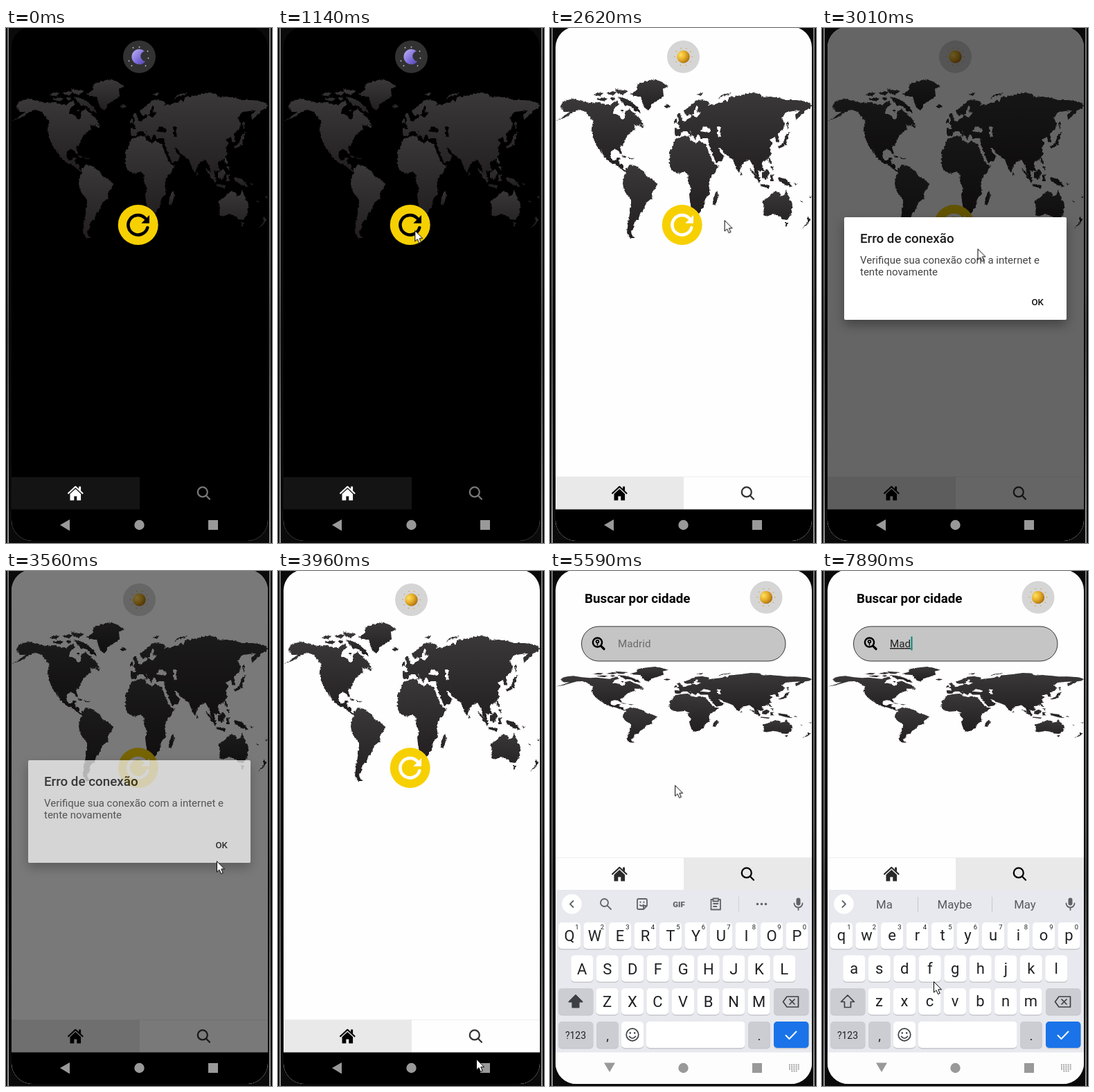
An HTML page for the animation above (8000 ms loop, 384 by 743 pixels).

```html
<!DOCTYPE html>
<html lang="pt">
<head>
<meta charset="utf-8">
<title>Weather app demo</title>
<style>
html, body { margin: 0; width: 100%; height: 100%; overflow: hidden; background: #0a0a0a; }
svg { display: block; width: 384px; height: 743px; font-family: Roboto, "Open Sans", sans-serif; }
#stage, #stage .run { animation: 8s infinite; }
#stage { animation-name: state; animation-timing-function: step-end; }

/* Themes, pages and layout change at once */
@keyframes state {
  0% {
    --bg: #000; --line: #000; --btn: #323232; --ink: #000; --moon: 1; --sun: 0;
    --tabL: #141414; --tabR: #000; --homeIcon: #fff; --findIcon: #777;
    --home: 1; --find: 0; --btnAt: translate(192.5px, 41.5px);
    --map: none; --up: 0px; --fieldY: 0px; --tabsY: 0px;
    --rim: transparent; --pin: #555; --nav: #000; --typing: 0;
    --hint: #6c6c6c; --c1: transparent; --c2: transparent; --c3: transparent;
    --lower: 0; --words: 0;
  }
  27.75% {
    --bg: #fefefe; --line: #eee; --btn: #d5d5d5; --ink: #fff; --moon: 0; --sun: 1;
    --tabL: #e9e9e9; --tabR: #fefefe; --homeIcon: #000; --findIcon: #333;
  }
  51.375% {
    --home: 0; --find: 1; --btnAt: translate(312px, 50.5px);
    --map: translateY(99.6px) scaleY(.843);
    --tabL: #fefefe; --tabR: #e9e9e9; --homeIcon: #2a2a2a; --findIcon: #000;
  }
  62.75% {
    --btnAt: translate(312px, 38px); --map: translateY(102.6px) scaleY(.478);
    --up: -12px; --fieldY: -23.5px; --tabsY: -234px;
    --rim: #333; --pin: #000; --nav: #fdfdfd; --typing: 1;
  }
  94.375% { --hint: transparent; --c1: #222; --lower: 1; }
  96.625% { --c2: #222; }
  97.375% { --words: 1; }
  98.5% { --c3: #222; }
}
@keyframes dim {
  0%, 14.375% { opacity: 0 } 16.25%, 21.125% { opacity: .6 } 23.375%, 35.75% { opacity: 0 }
  37.625%, 44.225% { opacity: .6 } 46.475%, 100% { opacity: 0 }
}
@keyframes dialog {
  0%, 14.375% { opacity: 0; transform: scale(.9) }
  16.25%, 21% { opacity: 1; transform: none }
  22.25% { opacity: 0; transform: none }
  35.75% { opacity: 0; transform: scale(.9) }
  37.625%, 44.125% { opacity: 1; transform: none }
  45.375%, 100% { opacity: 0; transform: none }
}
@keyframes slide {
  0%, 62.5% { transform: translateY(240px); animation-timing-function: ease-out }
  65.25%, 100% { transform: none }
}
@keyframes caret {
  0% { opacity: 0; transform: none } 62.75% { opacity: 1 } 65.625% { opacity: 0 }
  71.875% { opacity: 1 } 78.125% { opacity: 0 } 84.375% { opacity: 1 } 90.625% { opacity: 0 }
  94.375% { opacity: 1; transform: translateX(13px) }
  96.625% { opacity: 1; transform: translateX(21px) }
  98.5% { opacity: 1; transform: translateX(30px) }
}
@keyframes pointer {
  0%, 4.75% { transform: translate(236px, 750px) }
  8.5% { transform: translate(208px, 440px) }
  11.5% { transform: translate(194px, 298px) }
  14% { transform: translate(192px, 286px) }
  16% { transform: translate(240px, 330px) }
  19% { transform: translate(306px, 389px) }
  20.6% { transform: translate(309px, 391px) }
  21.875% { transform: translate(293px, 346px) }
  24.75% { transform: translate(214px, 100px) }
  26.5% { transform: translate(195px, 46px) }
  28% { transform: translate(195px, 44px) }
  30% { transform: translate(222px, 130px) }
  32.75% { transform: translate(253px, 277px) }
  34.5% { transform: translate(200px, 287px) }
  36% { transform: translate(196px, 288px) }
  38% { transform: translate(232px, 325px) }
  41.6% { transform: translate(309px, 391px) }
  43.5% { transform: translate(310px, 393px) }
  44.5% { transform: translate(305px, 417px) }
  47.5%, 49.5% { transform: translate(287px, 704px) }
  51%, 51.8% { transform: translate(285px, 677px) }
  56.375% { transform: translate(230px, 255px) }
  59.25%, 61.5% { transform: translate(172px, 130px) }
  69.875% { transform: translate(181px, 308px) }
  71.5% { transform: translate(199px, 400px) }
  76% { transform: translate(62px, 545px) }
  78% { transform: translate(39px, 575px) }
  80.2% { transform: translate(72px, 590px) }
  85.6%, 100% { transform: translate(162px, 592px) }
}

#dim { animation-name: dim !important; }
#dialog { animation-name: dialog !important; transform-origin: 192.5px 347px; }
#keyboard { animation-name: slide !important; }
#caret { animation-name: caret !important; animation-timing-function: step-end !important; }
#pointer, #dim, #dialog { animation-timing-function: linear !important; }
#pointer { animation-name: pointer !important; }

#map { transform: var(--map); }
#round { transform: var(--btnAt); }
#title { transform: translateY(var(--up)); }
#field { transform: translateY(var(--fieldY)); }
#tabs { transform: translateY(var(--tabsY)); }
.home { opacity: var(--home); }
.find { opacity: var(--find); }
.typing { opacity: var(--typing); }
.resting { opacity: calc(1 - var(--typing)); }
.low { opacity: var(--lower); }
.up { opacity: calc(1 - var(--lower)); }
.words { opacity: var(--words); }
.tools { opacity: calc(1 - var(--words)); }
.line { fill: none; stroke-linecap: round; stroke-linejoin: round; }
.typed tspan { text-decoration: underline; }
#keyboard text { text-anchor: middle; fill: #202124; }
</style>
</head>
<body>
<svg id="stage" viewBox="0 0 384 743">
  <defs>
    <clipPath id="screen"><rect x="8" y="-2" width="370" height="742" rx="30"/></clipPath>
    <linearGradient id="edge" x2="0" y2="1">
      <stop stop-color="#7c7c7c"/><stop offset=".5" stop-color="#606060"/>
      <stop offset=".6" stop-color="#505050"/><stop offset="1" stop-color="#999"/>
    </linearGradient>
    <linearGradient id="land" x2="0" y2="1">
      <stop stop-color="#3a3839"/><stop offset="1" stop-color="#231f20"/>
    </linearGradient>
    <linearGradient id="wide" href="#land" gradientUnits="userSpaceOnUse" x1="0" y1="92" x2="0" y2="220"/>
    <radialGradient id="gold" cx=".3" cy=".35" r=".75">
      <stop stop-color="#ffe060"/><stop offset=".5" stop-color="#e6ae28"/><stop offset="1" stop-color="#a86c10"/>
    </radialGradient>
    <linearGradient id="violet" x2="1" y2="1">
      <stop stop-color="#c3b6f5"/><stop offset=".6" stop-color="#7a6bd8"/><stop offset="1" stop-color="#4f42a8"/>
    </linearGradient>
    <filter id="coast" color-interpolation-filters="sRGB">
      <feTurbulence type="fractalNoise" baseFrequency=".28" numOctaves="2" seed="4"/>
      <feDisplacementMap in="SourceGraphic" scale="4" xChannelSelector="R" yChannelSelector="G"/>
    </filter>
    <filter id="shade" x="-15%" y="-25%" width="130%" height="160%">
      <feDropShadow dx="0" dy="7" stdDeviation="8" flood-opacity=".35"/>
    </filter>
  </defs>

  <rect width="384" height="743" fill="#0a0a0a"/>
  <rect x="2" width="2" height="743" fill="url(#edge)"/>
  <rect x="380" width="2" height="743" fill="url(#edge)"/>

  <g clip-path="url(#screen)">
    <rect x="8" y="-2" width="370" height="742" fill="var(--bg)"/>

    <g id="map"><g fill="url(#land)" fill-rule="evenodd" filter="url(#coast)">
      <path d="M17 117L15 111 22 105 33 102 46 106 58 108 67 107 76 109 86 111 92 107 97 104 100 110 93 115 91 122 99 126 104 132 108 129 108 121 115 117 121 123 129 129 134 139 127 141 121 140 124 146 116 151 110 158 107 166 101 172 104 181 102 182 98 176 93 175 88 178 87 185 90 191 95 191 97 187 101 187 99 195 106 197 106 204 112 207 107 207 98 199 86 193 78 186 72 172 76 183 68 171 62 158 60 146 62 135 55 124 46 118 38 119 30 124 20 130 8 134 19 128 28 121 20 121Z"/>
      <path d="M116 95L127 89 125 82 138 77 152 74 162 78 171 84 163 88 164 98 155 105 147 110 143 119 137 116 133 107 131 99 122 98Z"/>
      <path d="M62 97L70 93 77 94 73 98ZM67 103L76 100 83 102 79 106ZM81 95L91 91 97 93 91 97ZM87 101L92 99 94 103 89 105ZM98 99L109 102 118 107 127 115 131 122 123 120 117 113 108 111 102 105ZM94 88L113 91 105 96 98 95ZM102 118L107 118 105 122ZM164 112L169 110 174 112 170 116 166 115Z"/>
      <path d="M101 182L111 186 106 186ZM113 187L122 188 117 190ZM130 140L136 140 133 145Z"/>
      <path d="M109 203L116 197 124 199 131 204 137 208 139 214 147 218 154 224 153 231 148 236 147 246 139 252 135 262 130 268 128 275 122 279 121 286 117 293 118 299 122 303 116 303 111 295 113 280 116 262 117 248 109 238 105 226 106 215 110 210Z"/>
      <path d="M181 160L188 157 200 155 203 162 211 166 216 163 225 167 229 179 234 190 238 197 243 198 240 207 231 217 229 225 231 238 224 247 223 256 216 267 209 270 205 266 202 250 201 240 204 232 199 221 200 212 195 208 184 210 176 206 172 197 173 180 178 168Z"/>
      <path d="M241 234L243 241 239 256 235 254 236 243Z"/>
      <g fill="url(#wide)">
        <path d="M180 152L180 145 188 146 186 139 193 136 199 131 204 129 205 125 196 126 194 119 202 113 210 105 220 103 230 107 229 112 237 110 250 107 250 168 236 167 229 167 228 159 217 159 214 153 210 161 206 155 203 149 201 147 206 154 203 157 198 149 192 149 188 155 182 156ZM217 149L222 141 232 147 230 151ZM206 126L211 113 214 114 212 121 218 122 212 129ZM240 142L247 143 245 149 247 157 242 156 242 148Z"/>
        <path d="M249 107L253 103 256 107 258 100 266 99 275 97 290 93 302 94 308 100 318 99 330 101 342 104 356 104 370 106 377 110 376 116 368 119 363 125 355 133 354 125 361 119 350 120 340 122 335 130 339 139 336 147 329 152 330 165 326 164 325 157 317 161 321 166 318 172 319 183 311 192 305 194 309 205 304 208 300 204 303 219 299 215 295 206 292 197 288 190 283 192 276 199 273 209 269 203 264 190 258 185 252 181 246 173 243 173 247 182 252 186 247 192 240 195 235 183 229 168 238 163 248 165Z"/>
        <path d="M183 139L186 133 184 124 188 124 190 131 194 135 190 139ZM179 132L184 130 183 136 179 137ZM243 103L246 97 262 93 258 96 248 99ZM212 96L220 93 218 98ZM329 172L337 165 340 155 346 150 343 160 341 168 333 173ZM343 148L342 136 345 136ZM275 207L278 212 275 213Z"/>
      </g>
      <path d="M288 202L295 208 304 219 303 224 296 216ZM303 225L317 228 316 231 304 228ZM306 209L313 203 317 209 312 219 306 216ZM318 212L324 211 321 215 323 221 318 221ZM314 186L318 188 320 197 317 195ZM318 200L323 200 322 207ZM329 215L341 218 350 229 343 228 331 221ZM352 222L358 226 354 226Z"/>
      <path d="M307 249L316 244 323 236 331 237 333 243 338 241 341 233 345 244 350 254 348 268 343 277 335 276 330 270 322 268 313 272 308 270 309 262ZM339 281L344 281 341 287ZM372 272L376 277 372 282 364 290 368 284 372 279ZM361 248L365 252 363 252ZM374 243L378 242 376 245Z"/>
    </g></g>

    <g class="home">
      <circle cx="190.7" cy="284" r="29" fill="#f7d002"/>
      <path d="M204.3 288A14.2 14.2 0 1 1 201 274.5" class="line" stroke="var(--ink)" stroke-width="4.6"/>
      <path d="M207 270V281.7H195.3Z" fill="var(--ink)"/>
    </g>

    <g class="find">
      <text id="title" x="50" y="58" font-size="18.8" font-weight="700" fill="#000">Buscar por cidade</text>
      <g id="field">
        <rect x="45.5" y="103.5" width="294.5" height="50" rx="25" fill="#c5c5c5" stroke="var(--rim)"/>
        <g stroke="var(--pin)" class="line" stroke-width="2.5">
          <circle cx="68.5" cy="126.5" r="6.6"/>
          <path d="M73.8 131.8L78 136" stroke-width="3.2"/>
          <circle cx="68.5" cy="125.3" r="1.9" stroke-width="1.8"/>
          <path d="M68.5 128.5V130.5" stroke-width="1.6"/>
        </g>
        <text x="98" y="133.5" font-size="15.2" fill="var(--hint)">Madrid</text>
        <text class="typed" x="98" y="133.5" font-size="15.2"><tspan fill="var(--c1)">M</tspan><tspan fill="var(--c2)">a</tspan><tspan fill="var(--c3)">d</tspan></text>
        <rect id="caret" class="run" x="98.5" y="118" width="2" height="20" fill="#00897b"/>
      </g>
    </g>

    <g id="round">
      <circle r="23.5" fill="var(--btn)"/>
      <g style="opacity:var(--moon)">
        <path d="M7.5-8A11 11 0 1 0 8.9 6.4 7.3 7.3 0 0 1 7.5-8Z" fill="url(#violet)"/>
        <g id="stars" fill="#c9c4d8"></g>
      </g>
      <g style="opacity:var(--sun)">
        <circle r="9.2" fill="url(#gold)"/>
        <circle r="12.8" class="line" stroke="#d9a036" stroke-width="1.6" stroke-dasharray="0 8.04"/>
      </g>
    </g>

    <g id="tabs">
      <rect x="8" y="647" width="370" height="48" fill="var(--line)"/>
      <rect x="8" y="648" width="185" height="47" fill="var(--tabL)"/>
      <rect x="193" y="648" width="185" height="47" fill="var(--tabR)"/>
      <g transform="translate(88.3 659)">
        <path d="M1.8 12.3L12 2.8 22.2 12.3" class="line" stroke="var(--homeIcon)" stroke-width="2.2"/>
        <path d="M4.2 13.2L12 6 19.8 13.2V22.5H14V16.5H10V22.5H4.2ZM16.8 2.5H19.8V9L16.8 6Z" fill="var(--homeIcon)"/>
      </g>
      <g class="line" stroke="var(--findIcon)" stroke-width="2.3">
        <circle cx="283.8" cy="669.4" r="7"/><path d="M289 674.7L294 679.8"/>
      </g>
    </g>

    <rect id="dim" class="run" x="8" y="-2" width="370" height="697"/>
    <g id="dialog" class="run">
      <rect x="32" y="273" width="321" height="148" rx="2" fill="#fff" filter="url(#shade)"/>
      <text x="55" y="310" font-size="18.8" font-weight="500" fill="#1c1c1c">Erro de conexão</text>
      <g font-size="15" fill="#444">
        <text x="55" y="339.5">Verifique sua conexão com a internet e</text>
        <text x="55" y="357">tente novamente</text>
      </g>
      <text x="302.5" y="399.7" font-size="13.2" font-weight="500" fill="#111">OK</text>
    </g>

    <g id="keyboard" class="run">
      <rect x="8" y="460" width="370" height="236" fill="#e8e9ee"/>
      <circle cx="31.5" cy="480.5" r="14.3" fill="#fff"/>
      <g class="tools line" stroke="#5f6368" stroke-width="1.8">
        <path d="M33.5 476L29 480.5 33.5 485"/>
        <circle cx="78.5" cy="478.5" r="5.5"/><path d="M82.8 482.8L88 488"/>
        <path d="M140 483V475Q140 473 138 473H128Q126 473 126 475V486Q126 488 128 488H135ZM140 483H135V488M130 482Q132.5 484.5 135 481.5M130.5 477.5V478M135.5 477.5V478"/>
        <path d="M235 474H232.5V488.5H246V474H243.5M235.5 472.5H243V476.5H235.5ZM236 480H242.5M236 484H240.5"/>
        <path d="M272.5 470V491" stroke="#cfd1d6" stroke-width="1"/>
        <path d="M299.5 480.5h.01M305.5 480.5h.01M311.5 480.5h.01" stroke-width="3.6"/>
      </g>
      <text class="tools" x="186" y="484.5" font-size="11.5" font-weight="900" style="fill:#5f6368">GIF</text>
      <g class="words">
        <path d="M29.5 476L34 480.5 29.5 485" class="line" stroke="#5f6368" stroke-width="1.8"/>
        <path d="M138.5 470V492M245.5 470V492" stroke="#c6c8cd"/>
        <g id="words" opacity=".72"></g>
      </g>
      <rect x="355.5" y="471.5" width="6" height="11" rx="3" fill="#5f6368"/>
      <path d="M352.5 479.5A6 6 0 0 0 364.5 479.5M358.5 486V489" class="line" stroke="#5f6368" stroke-width="1.8"/>
      <g id="keys"></g>
      <g class="line" stroke="#3c4043" stroke-width="1.7">
        <path d="M37 612L46.5 621.5H41.5V629.5H32.5V621.5H27.5Z"/>
        <path class="up" d="M37 612L46.5 621.5H41.5V629.5H32.5V621.5H27.5Z" style="fill:#3c4043"/>
        <path d="M342 614H358.5V629H342L336.5 621.5ZM346 618L353 625M353 618L346 625"/>
        <circle cx="119" cy="669" r="8.8"/>
        <path d="M115.8 666.5h.01M122.2 666.5h.01" stroke-width="2.6"/>
        <path d="M114.5 671.5Q119 677 123.5 671.5"/>
        <path d="M340.5 670L345.5 675 355.5 664.5" stroke="#fff" stroke-width="2"/>
      </g>
    </g>

    <rect x="8" y="694.5" width="370" height="46" fill="var(--nav)"/>
    <g fill="#999">
      <path class="resting" d="M78 717L92 709V725.5Z"/>
      <path class="typing" d="M78 709.5H94L86 723Z"/>
      <circle cx="192.5" cy="717" r="7.2"/>
      <rect x="292" y="710" width="14" height="14"/>
      <path class="typing line" d="M345 712.5H360M345 715.5H360M345 718.5H360M348.5 721.5H356.5" stroke="#999" stroke-width="1.8" style="stroke-linecap:butt" stroke-dasharray="1.8 1.4"/>
    </g>
  </g>

  <path id="pointer" class="run" d="M-.5.5V16L3 12.8 5.5 18.5 8.3 17.3 5.8 11.8H10.5Z" fill="#fff" stroke="#000"/>
</svg>
<script>
const byId = id => document.getElementById(id);
const text = (x, y, size, str, cls = "") =>
  `<text x="${x}" y="${y}" font-size="${size}" class="${cls}">${str}</text>`;
const key = (x, y, w, fill = "#fff") =>
  `<rect x="${x}" y="${y + 1}" width="${w}" height="38.5" rx="5" fill="#c6c8cd"/>` +
  `<rect x="${x}" y="${y}" width="${w}" height="38" rx="5" fill="${fill}"/>`;

const gray = "#cccdd3", pitch = 36.5, keyW = 32;
const rows = [["QWERTYUIOP", 12, 507], ["ASDFGHJKL", 30.3, 554.5], ["ZXCVBNM", 66.5, 602]];
let keys = "";
for (const [letters, left, y] of rows) {
  [...letters].forEach((ch, i) => {
    const x = left + i * pitch, mid = x + keyW / 2;
    keys += key(x, y, keyW);
    keys += text(mid, y + 27, 22, ch, "up") + text(mid, y + 26, 22, ch.toLowerCase(), "low");
    if (y === 507) keys += text(x + 27, y + 10, 9.5, (i + 1) % 10);
  });
}
keys += key(12, 602, 50.5, gray) + key(323, 602, 50.5, gray);
keys += key(12, 650, 50.5, gray) + key(67, 650, keyW, gray) + key(103, 650, keyW);
keys += key(139, 650, 142.5) + key(286, 650, keyW, gray) + key(323, 650, 50.5, "#1a73e8");
keys += text(37, 674.5, 14, "?123") + text(83, 677, 19, ",") + text(302, 677, 19, ".");
byId("keys").innerHTML = keys;

byId("words").innerHTML = [[90, "Ma"], [191.5, "Maybe"], [293, "May"]]
  .map(([x, w]) => text(x, 487, 16.8, w)).join("");

byId("stars").innerHTML = [[-15, 6], [-11, 13], [-9, -13], [12, -8], [13, 2], [9, 13], [0, -14]]
  .map(([x, y]) => `<circle cx="${x}" cy="${y}" r=".9"/>`).join("");
</script>
</body>
</html>
```
